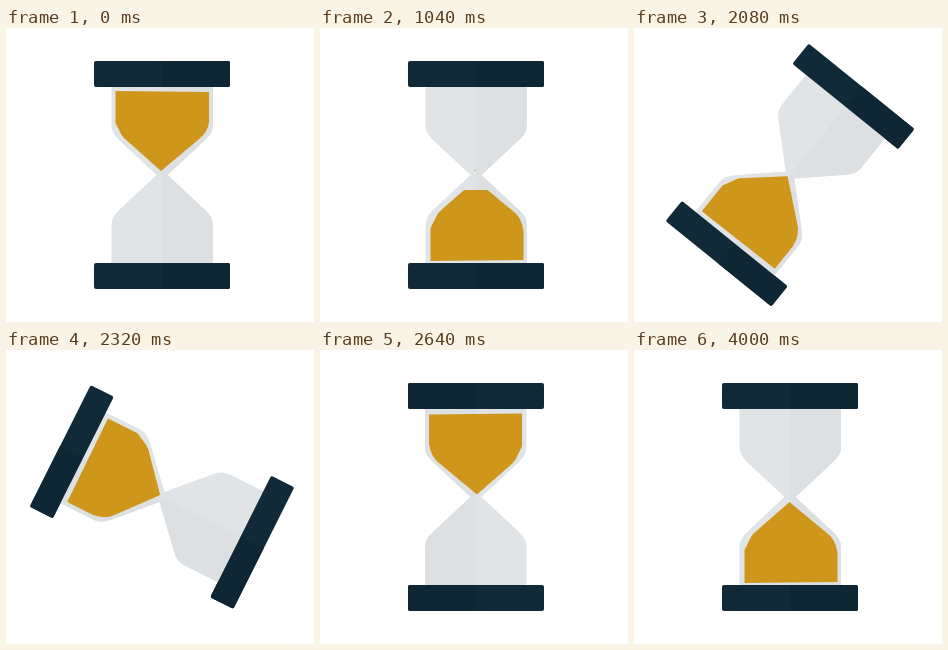
These frames come from a looping animation (308 px wide and 294 px high, 4.48 s). An HTML page:

```html
<!DOCTYPE html>
<html lang="en">
<head>
<meta charset="utf-8">
<title>Hourglass</title>
<style>
  html, body { margin: 0; width: 100%; height: 100%; overflow: hidden; background: #fff; }
  svg { display: block; width: 308px; height: 294px; }
  .glass { fill: #e0e4e7; }
  .wood { fill: #112a37; }
  .sand { fill: #cf961c; }
  .shade .glass { fill: #dce0e3; }
  .shade .wood { fill: #0f2734; }
</style>
</head>
<body>
<svg viewBox="0 0 308 294">
  <defs>
    <clipPath id="topClip"><rect id="topLevel" x="100" width="112" height="100"/></clipPath>
    <clipPath id="pileClip"><rect id="pileLevel" x="100" width="112" height="100"/></clipPath>
    <clipPath id="rightHalf"><rect x="156" y="20" width="80" height="254"/></clipPath>
    <g id="body">
      <path class="glass" d="M105.5 58V97Q105.5 105 113 112L150.5 147L113 182Q105.5 189 105.5 197V236H207V197Q207 189 199 182L161.500 147L199 112Q207 105 207 97V58Z"/>
      <rect class="wood" x="88" y="33" width="136" height="26" rx="2"/>
      <rect class="wood" x="88" y="235" width="136" height="26" rx="2"/>
    </g>
  </defs>
  <g id="hourglass">
    <use href="#body"/>
    <g class="shade" clip-path="url(#rightHalf)">
      <path class="glass" d="M156 58H207V97Q207 105 199 112L161.500 147L199 182Q207 189 207 197V236H156Z"/>
      <rect class="wood" x="150" y="33" width="74" height="26" rx="2"/>
      <rect class="wood" x="150" y="235" width="74" height="26" rx="2"/>
    </g>
    <g clip-path="url(#topClip)">
      <path class="sand" d="M109.500 63L203 64V94Q202 104 192 112L155 143L122 113.500Q117 110 115 106L109.500 95Z"/>
    </g>
    <g id="pile" clip-path="url(#pileClip)">
      <path class="sand" d="M155.500 152L191 181.500Q202 189 203.500 203V232L110.500 233V200L117 187Q119 183.500 123 180.500Z"/>
    </g>
  </g>
</svg>
<script>
  const LOOP = 4480, STEP = 80;
  const TURN = { show: 1680, start: 1840, length: 800, end: 2720 };
  const DRAIN = 880, FILL = 1040;
  const el = id => document.getElementById(id);
  const hourglass = el('hourglass'), pile = el('pile');
  const topLevel = el('topLevel'), pileLevel = el('pileLevel');

  const ease = (t, start, length) => {
    const u = Math.min(1, Math.max(0, (t - start) / length));
    return u * u * (3 - 2 * u);
  };

  function draw(t) {
    const start = t < TURN.end ? 240 : 3000;
    const turning = t >= TURN.show && t < TURN.end;
    const angle = turning ? 180 * ease(t, TURN.start, TURN.length) : 0;

    topLevel.setAttribute('y', 63 + 81 * ease(t, start, DRAIN));
    pileLevel.setAttribute('y', 233 - 82 * ease(t, start, FILL));
    hourglass.setAttribute('transform', `rotate(${angle} 156 147)`);
    // The sand settles towards the neck while the glass is turned.
    pile.setAttribute('transform', turning ? 'translate(-.5 -2.5)' : '');
  }

  const origin = performance.now();
  function tick() {
    const t = (performance.now() - origin) % LOOP;
    draw(Math.floor(t / STEP) * STEP);
    requestAnimationFrame(tick);
  }
  draw(0);
  requestAnimationFrame(tick);
</script>
</body>
</html>
```
